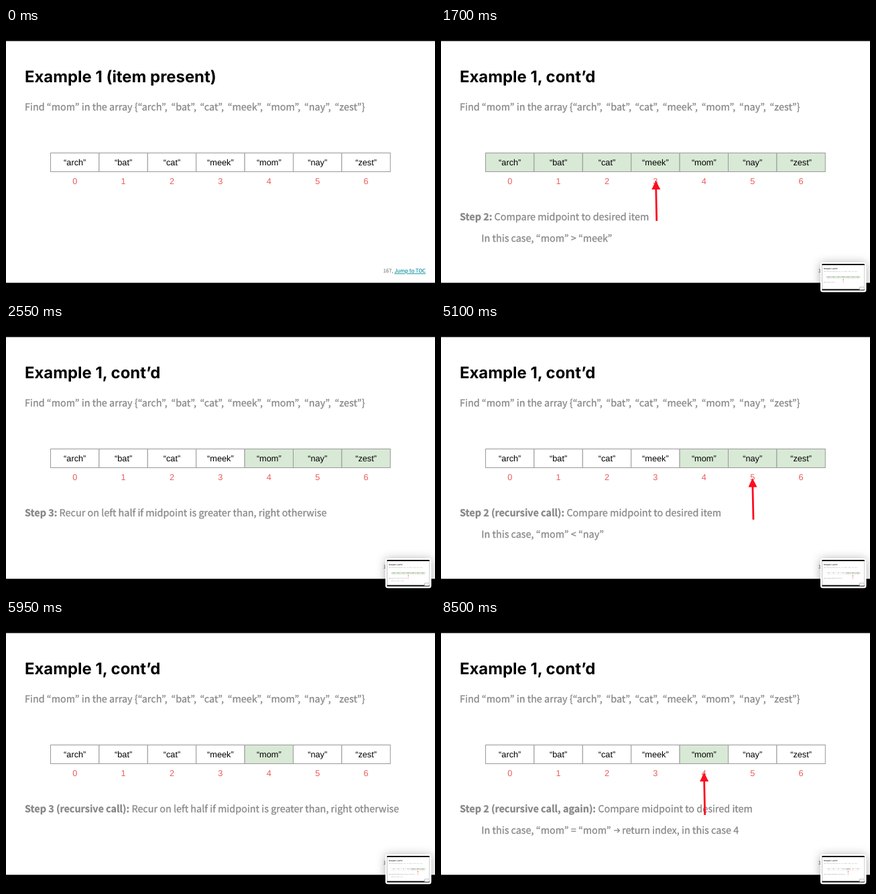
Recreate the animation shown at these times as an HTML page. Size 640 by 400 pixels, loop 9.35 s.

```html
<!DOCTYPE html>
<html lang="en">
<head>
<meta charset="utf-8">
<title>Binary search slides</title>
<style>
  html, body { margin: 0; width: 100%; height: 100%; overflow: hidden; background: #fff; }
  svg { display: block; width: 640px; height: 400px; }
  text { text-rendering: geometricPrecision; white-space: pre; }
  .title { font: 700 23.9px Inter, sans-serif; }
  .body {
    font: 400 14.4px "Noto Sans CJK KR", "Noto Sans CJK JP", "Noto Sans CJK SC", "Open Sans", sans-serif;
    font-feature-settings: "pwid";
    fill: #878787;
    stroke: #878787;
    stroke-width: .02em;
  }
  .body .b { font-weight: 700; }
  .list { word-spacing: 2.45px; }
  .page { font-size: 7.7px; }
  .link { fill: #0e929e; stroke: #0e929e; text-decoration: underline; }
  .cell, .index { font: 12.75px "Liberation Sans", Arial, sans-serif; text-anchor: middle; }
  .index { fill: #ec5c5c; }
  .thumb { filter: drop-shadow(0 1px 7px rgba(0, 0, 0, .32)); }
</style>
</head>
<body>
<svg id="stage" viewBox="0 0 640 400"></svg>
<script>
const WORDS = ["arch", "bat", "cat", "meek", "mom", "nay", "zest"];
const LEFT = 66.5, TOP = 186.5, CELL_W = 72.4, CELL_H = 28;
const LOOP = 9350;

const FIND = "Identify midpoint";
const COMPARE = "Compare midpoint to desired item";
const RECUR = "Recur on left half if midpoint is greater than, right otherwise";
const CASE = "In this case, “mom” ";

// lit: first and last green cell; arrow: tip x, tip y, tail x, tail y
const slides = [
  { at: 0 },
  { at: 850, lit: [0, 6], step: ["Step 1:", FIND], arrow: [320.5, 227.5, 321.7, 288] },
  { at: 1700, lit: [0, 6], step: ["Step 2:", COMPARE], arrow: [320.5, 227.5, 321.7, 288],
    note: CASE + "&gt; “meek”" },
  { at: 2550, lit: [4, 6], step: ["Step 3:", RECUR] },
  { at: 4250, lit: [4, 6], step: ["Step 1 (recursive call):", FIND], arrow: [464.7, 230.5, 466, 293] },
  { at: 5100, lit: [4, 6], step: ["Step 2 (recursive call):", COMPARE], arrow: [464.7, 230, 466, 292],
    note: CASE + "&lt; “nay”" },
  { at: 5950, lit: [4, 4], step: ["Step 3 (recursive call):", RECUR] },
  { at: 7650, lit: [4, 4], step: ["Step 1 (recursive call, again):", FIND], arrow: [392.4, 229, 393.7, 292] },
  { at: 8500, lit: [4, 4], step: ["Step 2 (recursive call, again):", COMPARE], arrow: [392.4, 227.5, 393.7, 291],
    note: CASE + "= “mom”", result: "return index, in this case 4" }
];

const text = (cls, x, y, str) => `<text class="${cls}" x="${x}" y="${y}">${str}</text>`;
const span = (cls, str) => `<tspan class="${cls}">${str}</tspan>`;
const rect = (x, y, w, h, attrs = "") => `<rect x="${x}" y="${y}" width="${w}" height="${h}" ${attrs}/>`;

function table(lit) {
  return WORDS.map((word, i) => {
    const x = LEFT + i * CELL_W, mid = x + CELL_W / 2;
    const fill = lit && i >= lit[0] && i <= lit[1] ? "#d8e9d5" : "#fff";
    return rect(x, TOP, CELL_W, CELL_H, `fill="${fill}" stroke="#999"`) +
      text("cell", mid, 205, `“${word}”`) + text("index", mid, 233, i);
  }).join("");
}

function arrow([x, y, tailX, tailY]) {
  return `<path d="M${tailX} ${tailY}L${x + .2} ${y + 10}" stroke="#fc0d20" stroke-width="2.8"/>` +
    `<path d="M${x} ${y}l6.8 13.6h-13z" fill="#fc0d20"/>`;
}

function thumb(i, depth) {
  return `<g class="thumb">${rect(566, 349.8, 68.5, 44.4, 'rx="3.5" fill="#fff"')}</g>` +
    `<g transform="translate(568.4 352) scale(.099)">${slide(i, depth)}</g>`;
}

function slide(i, depth) {
  const s = slides[i];
  const list = WORDS.map(w => `“${w}”`).join(", ");
  let out = rect(0, 0, 640, 400) + rect(0, 19.5, 640, 360.8, 'fill="#fff"') +
    text("title", 28, 81, `Example 1${i ? ", cont’d" : " (item present)"}`) +
    text("body", 28, 123, `Find “mom” in the array {${span("list", list)}}`) +
    table(s.lit) +
    text("body page", 562.8, 365.3, `${167 + i}, ${span("link", "Jump to TOC")}`);
  if (s.step) out += text("body", 28, 286.5, `${span("b", s.step[0])} ${s.step[1]}`);
  if (s.note) out += text("body", 60.3, 319, s.note);
  if (s.result) {
    out += '<path d="M258 314.2h8M263 311l3.3 3.2l-3.3 3.2" fill="none" stroke="#878787" stroke-width="1.3"/>' +
      text("body", 270, 319, s.result);
  }
  if (s.arrow) out += arrow(s.arrow);
  if (i && depth) out += thumb(i - 1, depth - 1);
  return out;
}

const stage = document.getElementById("stage");
stage.innerHTML = slides.map((s, i) => `<g display="none">${slide(i, 2)}</g>`).join("");
const layers = [...stage.children];
const start = performance.now();
let shown = -1;

function draw(now) {
  const t = Math.max(0, now - start) % LOOP;
  const current = slides.findLastIndex(s => s.at <= t);
  if (current !== shown) {
    layers.forEach((g, i) => g.setAttribute("display", i === current ? "inline" : "none"));
    shown = current;
  }
  requestAnimationFrame(draw);
}
draw(start);
</script>
</body>
</html>
```
